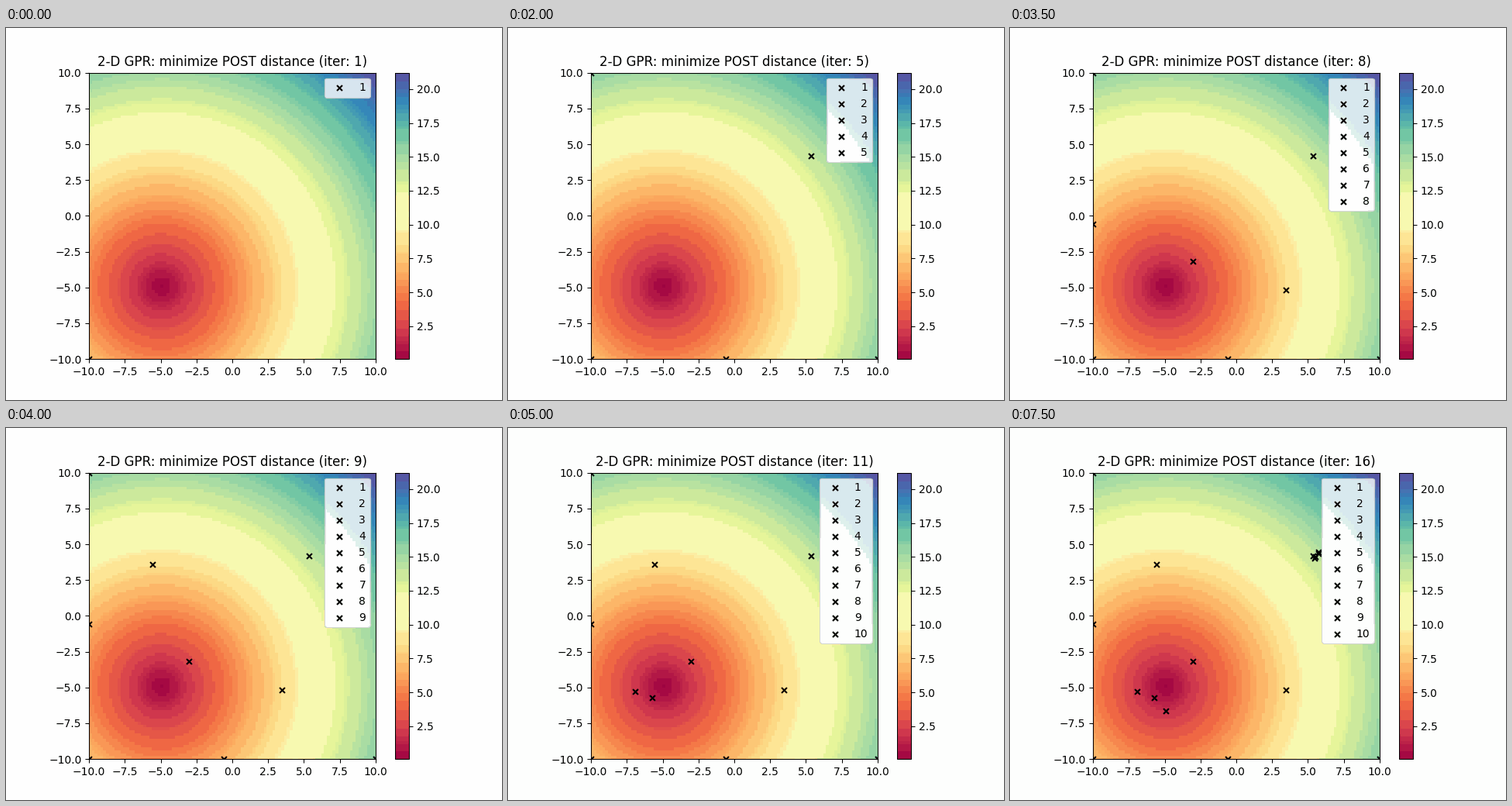
Animation of 640 by 480 pixels, one loop 8 s. Source, as a matplotlib script:

```python
from itertools import product

import numpy as np
import matplotlib.pyplot as plt
from matplotlib.animation import FuncAnimation

LOW, HIGH = -10, 10
GOAL = np.array([-5, -5])
INTERVAL = 500
LABELLED = 10


def probe(reach, deg):
    """Point at a distance and bearing from the goal."""
    a = np.radians(deg)
    return GOAL + reach * np.array([np.cos(a), np.sin(a)])


def search_path():
    """Corners and edges first, then closing in, then retries far away."""
    corners = list(product((LOW, HIGH), repeat=2))[:3]
    mid = -0.58
    far = probe(13.85, 41.6)
    low, high = far + (0.14, -0.08), far + (0.40, 0.25)
    drift = np.array([-0.04, -0.11])
    return corners + [
        (mid, LOW), far, (LOW, mid),
        probe(2.69, 43), probe(8.46, -1.2), probe(8.6, 93.8),
        probe(1.03, 224), probe(1.95, 188.3),
        low, probe(1.63, 272.8), low + drift, high, high + drift,
    ]


def posterise(img, dpi):
    """Group colours into 3-4-3 bit cells and paint each with its mean."""
    rgba = np.rint(img * 255).astype(np.uint8)
    r, g, b = (rgba[..., k].astype(int) for k in range(3))
    cell = ((r >> 5) << 7) | ((g >> 4) << 3) | (b >> 5)
    count = np.maximum(np.bincount(cell.ravel(), minlength=1024), 1)
    for k, channel in enumerate((r, g, b)):
        total = np.bincount(cell.ravel(), channel.ravel(), minlength=1024)
        rgba[..., k] = (total / count).astype(np.uint8)[cell]
    return rgba, 0, 0


fig, ax = plt.subplots(figsize=(6.4, 4.8), dpi=100)
fig.set_agg_filter(posterise)

gx, gy = np.meshgrid(*[np.linspace(LOW, HIGH, 100)] * 2)
dist = np.hypot(gx - GOAL[0], gy - GOAL[1])
field = ax.imshow(dist, origin="lower", extent=(LOW, HIGH, LOW, HIGH),
                  cmap="Spectral")
fig.colorbar(field, ax=ax)

marks = [ax.scatter(x, y, s=25, marker="x", color="black", label=str(i))
         for i, (x, y) in enumerate(search_path(), 1)]
ax.set(xlim=(LOW, HIGH), ylim=(LOW, HIGH))


def update(step):
    n = step + 1
    for i, mark in enumerate(marks):
        mark.set_visible(i < n)
    ax.legend(handles=marks[:min(n, LABELLED)], loc="upper right")
    ax.set_title(f"2-D GPR: minimize POST distance (iter: {n})")
    return []


anim = FuncAnimation(fig, update, frames=len(marks), interval=INTERVAL,
                     init_func=lambda: update(0), repeat=True,
                     repeat_delay=0, blit=False)
plt.show()
```
